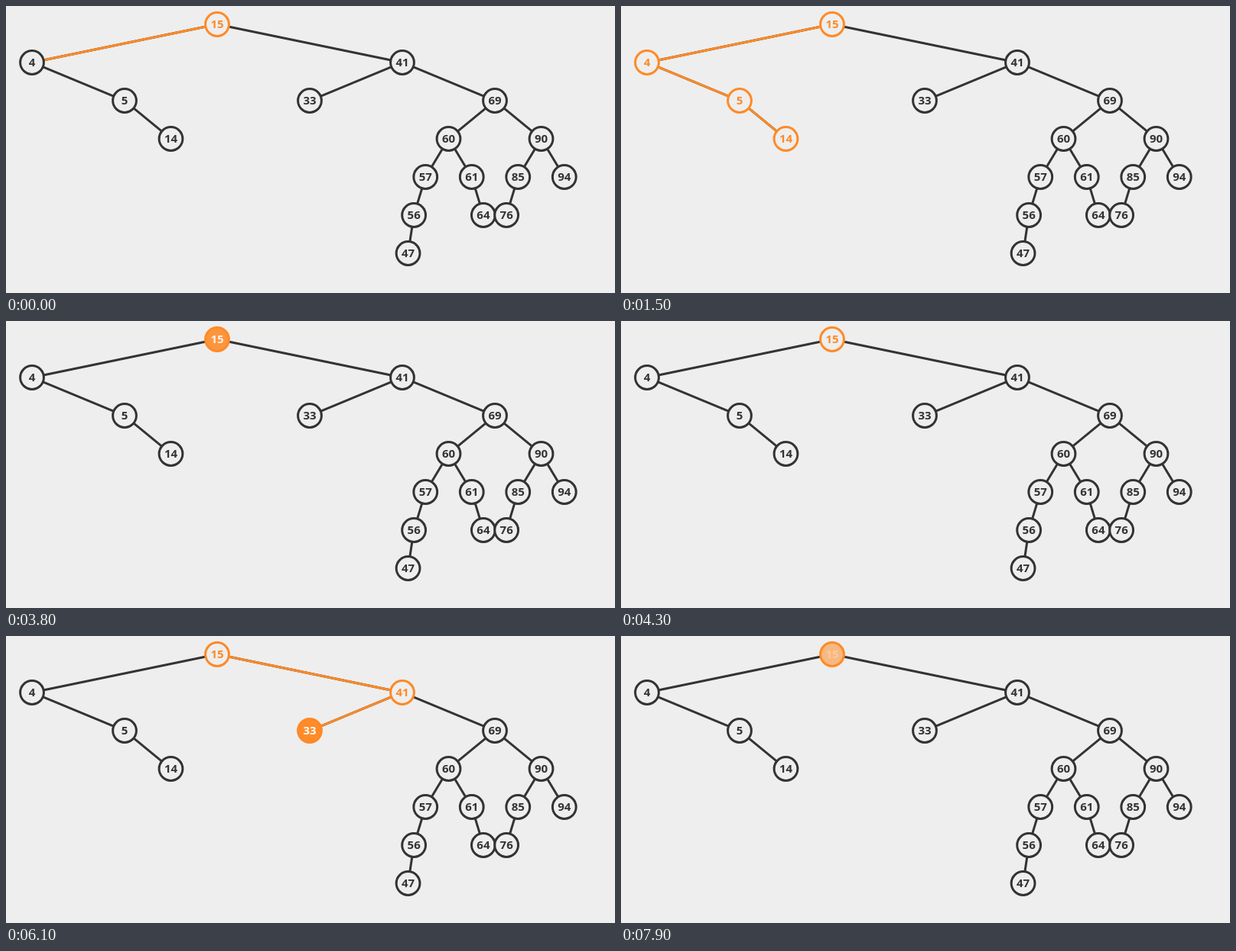
An HTML page with a canvas that plays this animation: 796 by 376 pixels, repeating every 8000 ms.

```html
<!DOCTYPE html>
<html lang="en">
<head>
<meta charset="utf-8">
<title>Binary search tree</title>
<style>
html, body { margin: 0; width: 100%; height: 100%; overflow: hidden; background: #eee; }
canvas { display: block; }
</style>
</head>
<body>
<canvas id="stage" width="796" height="376"></canvas>
<script>
const ctx = document.getElementById('stage').getContext('2d');
const LOOP = 8000;
const DARK = [51, 51, 51], ORANGE = [255, 138, 39], PAPER = [238, 238, 238], WHITE = [255, 255, 255];

const plain = { line: DARK, fill: PAPER, text: DARK };
const current = { line: ORANGE, fill: ORANGE, text: WHITE };
const visited = { line: ORANGE, fill: PAPER, text: ORANGE };

// Tree layout: each level halves the horizontal offset.
const nodes = [];
function insert(key) {
  let parent = null, x = 276, y = 24, dx = 242;
  let next = nodes[0];
  while (next) {
    parent = next;
    const right = key > parent.key;
    x = parent.x + (right ? dx : -dx);
    y = parent.y + 50;
    dx /= 2;
    next = nodes.find(n => n.parent === parent && (n.key > parent.key) === right);
  }
  nodes.push({ key, parent, x, y });
}
[15, 4, 5, 14, 41, 33, 69, 60, 57, 56, 47, 61, 64, 90, 85, 76, 94].forEach(insert);

// Node transitions: key, style, start, end (ms)
const changes = [
  [15, visited, -2, -1],
  [4, current, 0, 150], [4, visited, 150, 300],
  [5, current, 600, 750], [5, visited, 750, 900],
  [14, current, 1200, 1350], [14, visited, 1350, 1500],
  ...[15, 4, 5, 14].map(key => [key, plain, 1890, 2100]),
  [15, current, 2475, 3020], [15, visited, 3740, 4290],
  [41, current, 4850, 5000], [41, visited, 5000, 5150],
  [33, current, 5450, 5600],
  ...[15, 41, 33].map(key => [key, plain, 6100, 6190]),
  [15, current, 6360, 6900], [15, visited, 7650, 8200]
];

// Edge highlights: child key, grow start, grow end, fade start, fade end
const trails = [
  [4, -200, -1, 1890, 2100],
  [5, 300, 600, 1890, 2100],
  [14, 900, 1200, 1890, 2100],
  [41, 4620, 4850, 6100, 6190],
  [33, 5150, 5450, 6100, 6190]
];

const progress = (t, a, b) => Math.min(1, Math.max(0, (t - a) / (b - a)));
const mix = (a, b, p) => a.map((v, i) => v + (b[i] - v) * p);
const rgb = c => `rgb(${c.map(Math.round).join(',')})`;

function styleAt(key, t) {
  let style = plain;
  for (const [k, to, start, end] of changes) {
    if (k !== key || t <= start) continue;
    const p = progress(t, start, end), from = style;
    style = {
      line: mix(from.line, to.line, p),
      fill: mix(from.fill, to.fill, p),
      text: mix(from.text, to.text, p)
    };
  }
  return style;
}

function drawEdge(node, color, part = 1) {
  const { x, y } = node.parent;
  const dx = node.x - x, dy = node.y - y;
  const gap = 15 / Math.hypot(dx, dy);
  const end = gap + (1 - 2 * gap) * part;
  ctx.strokeStyle = rgb(color);
  ctx.beginPath();
  ctx.moveTo(x + dx * gap, y + dy * gap);
  ctx.lineTo(x + dx * end, y + dy * end);
  ctx.stroke();
}

function drawNode(node, t) {
  const style = styleAt(node.key, t);
  ctx.beginPath();
  ctx.arc(node.x, node.y, 15.4, 0, Math.PI * 2);
  ctx.fillStyle = rgb(style.fill);
  ctx.fill();
  ctx.strokeStyle = rgb(style.line);
  ctx.stroke();
  ctx.fillStyle = rgb(style.text);
  ctx.fillText(node.key, node.x, node.y + 5);
}

function draw(t) {
  ctx.fillStyle = rgb(PAPER);
  ctx.fillRect(0, 0, 796, 376);
  ctx.lineWidth = 3;
  ctx.font = '700 15px "Noto Sans", "Open Sans", sans-serif';
  ctx.textAlign = 'center';
  for (const node of nodes) if (node.parent) drawEdge(node, DARK);
  for (const [key, start, end, fade, gone] of trails) {
    if (t <= start || t >= gone) continue;
    const color = mix(ORANGE, DARK, progress(t, fade, gone));
    drawEdge(nodes.find(n => n.key === key), color, progress(t, start, end));
  }
  for (const node of nodes) drawNode(node, t);
}

const begin = performance.now();
function tick() {
  draw((performance.now() - begin) % LOOP);
  requestAnimationFrame(tick);
}
tick();
</script>
</body>
</html>
```
